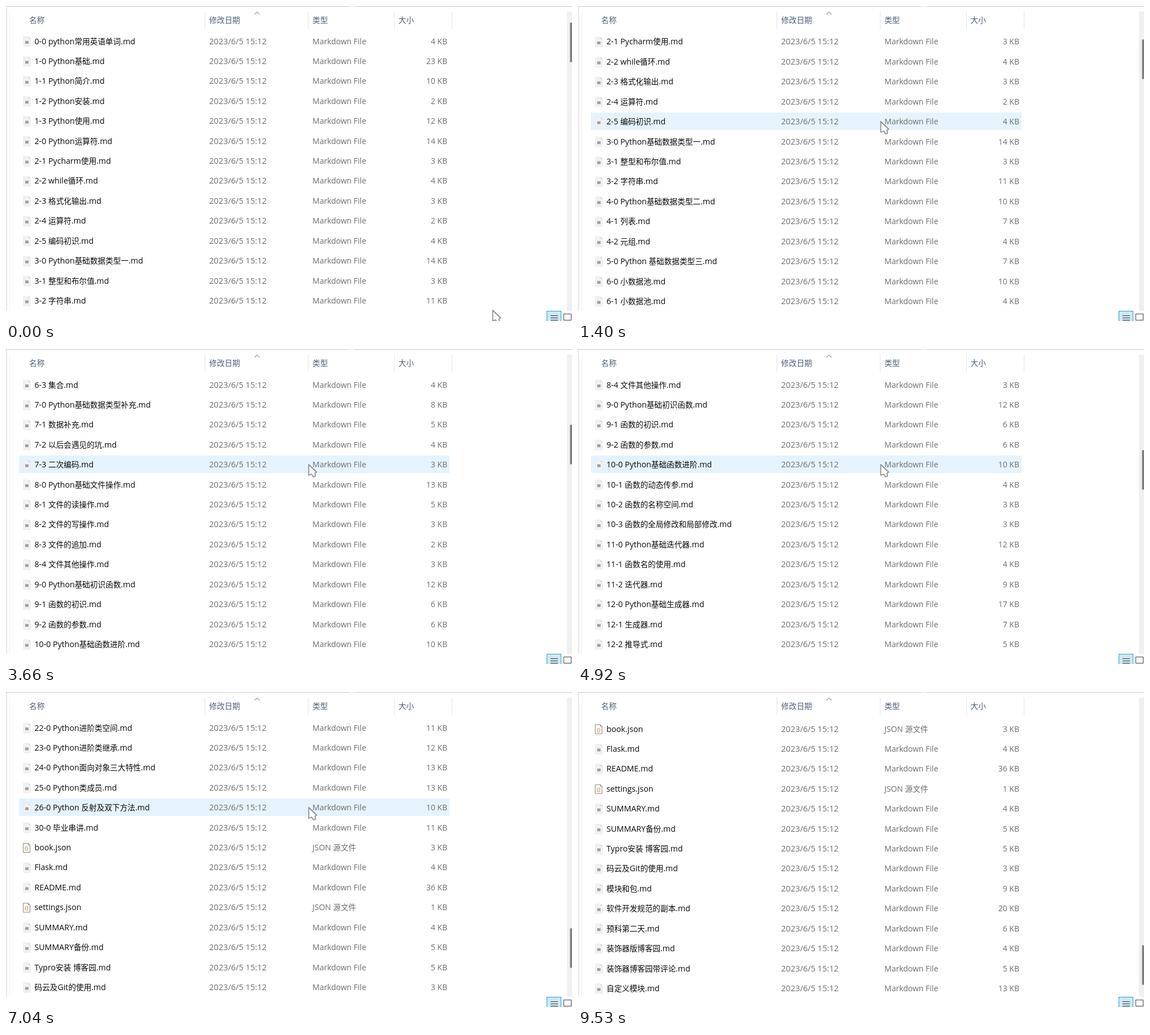
Animation, 1003 px wide and 559 px high, one loop 9.95 s. Source, as an HTML page:

```html
<!DOCTYPE html>
<html lang="zh-CN">
<head>
<meta charset="utf-8">
<title>Python 笔记</title>
<style>
html, body { margin: 0; width: 100%; height: 100%; overflow: hidden; background: #fff; }
svg { display: block; }
text { font: 14.2px 'Open Sans', 'Noto Sans CJK SC', 'Noto Sans CJK', sans-serif; fill: #0a0a0a; }
.cjk { font-size: 13.65px; }
.date { font-size: 14.6px; fill: #6d6d6d; }
.info { font-size: 14px; fill: #6d6d6d; }
.head { font-size: 13.7px; fill: #4c607a; }
.brace { font-size: 9px; font-weight: 600; fill: #d08a2c; text-anchor: middle; }
.size { text-anchor: end; }
</style>
</head>
<body>
<svg width="1003" height="559" viewBox="0 0 1003 559">
  <defs>
    <clipPath id="view"><rect x="0" y="46" width="990" height="495"/></clipPath>
    <g id="md">
      <path d="M31 -8.5H40L43.5 -5V8.5H31Z" fill="#f2f2f2" stroke="#e6e6e6" stroke-width=".8"/>
      <path d="M40 -8.5V-5H43.5Z" fill="#d4d4d4"/>
      <rect x="34" y="-1" width="6" height="5" fill="#a0a0a0"/>
    </g>
    <g id="json">
      <path d="M30.5 -8H39.5L42.5 -5V8H30.5Z" fill="#fff" stroke="#858585"/>
      <path d="M39.5 -8V-5H42.5" fill="none" stroke="#858585"/>
      <text class="brace" x="36.5" y="3.5">{}</text>
    </g>
  </defs>
  <rect width="1003" height="559" fill="#fff"/>
  <path d="M0 .5H1003" stroke="#c6c6c6"/>
  <path d="M608 .5H617" stroke="#eee"/>
  <path d="M1 1V541" stroke="#d2d2d2"/>
  <path d="M6.5 10V541" stroke="#f1f1f1"/>

  <path d="M352.5 10V41M535.5 10V41M688.5 10V41M790.5 10V41" stroke="#e4e4e4"/>
  <path d="M440.5 15L445 10.5L449.5 15" fill="none" stroke="#5c5c5c"/>
  <text class="head" x="41" y="30.3">名称</text>
  <text class="head" x="360" y="30.3">修改日期</text>
  <text class="head" x="543" y="30.3">类型</text>
  <text class="head" x="695.5" y="30.3">大小</text>

  <rect id="hover" x="23" width="763" height="31" fill="#e5f3ff"/>
  <g clip-path="url(#view)"><g id="list"></g></g>

  <rect x="994" y="10" width="9" height="531" fill="#f0f0f0"/>
  <rect id="thumb" x="999.5" width="3.5" height="70" fill="#7f7f7f"/>

  <rect x="958.5" y="541.5" width="25" height="20" fill="#cde8f6" stroke="#26a0da"/>
  <path d="M965 549.5H978M965 553.5H978M965 557.5H978" stroke="#333"/>
  <rect id="tile" x="984" y="541" width="19" height="18" fill="#d8ebfb"/>
  <rect x="988.5" y="546.5" width="13" height="11" fill="#fff" stroke="#444"/>

  <path id="cursor" d="M.5 .5V19.5L5.5 17.5L9 22.5L12.5 21L11.5 16L14.5 14Z" fill="#fff" stroke="#8f8f8f" stroke-width="1.8" stroke-linejoin="round"/>
</svg>
<script>
const LOOP = 9950, PITCH = 35.42, FIRST = 62.5, HOME = [536, 204.5];

// "name|size in KB"; a missing extension means .md
const files = `0-0 python常用英语单词|4
1-0 Python基础|23
1-1 Python简介|10
1-2 Python安装|2
1-3 Python使用|12
2-0 Python运算符|14
2-1 Pycharm使用|3
2-2 while循环|4
2-3 格式化输出|3
2-4 运算符|2
2-5 编码初识|4
3-0 Python基础数据类型一|14
3-1 整型和布尔值|3
3-2 字符串|11
4-0 Python基础数据类型二|10
4-1 列表|7
4-2 元组|4
5-0 Python 基础数据类型三|7
6-0 小数据池|10
6-1 小数据池|4
6-2 深浅拷贝|4
6-3 集合|4
7-0 Python基础数据类型补充|8
7-1 数据补充|5
7-2 以后会遇见的坑|4
7-3 二次编码|3
8-0 Python基础文件操作|13
8-1 文件的读操作|5
8-2 文件的写操作|3
8-3 文件的追加|2
8-4 文件其他操作|3
9-0 Python基础初识函数|12
9-1 函数的初识|6
9-2 函数的参数|6
10-0 Python基础函数进阶|10
10-1 函数的动态传参|4
10-2 函数的名称空间|3
10-3 函数的全局修改和局部修改|3
11-0 Python基础迭代器|12
11-1 函数名的使用|4
11-2 迭代器|9
12-0 Python基础生成器|17
12-1 生成器|7
12-2 推导式|5
12-3 生成器表达式|4
13-0 Python基础内置函数|15
13-1 内置函数一|8
13-2 内置函数二|6
13-3 匿名函数|4
13-4 高阶函数|5
14-0 Python基础闭包|9
14-1 闭包|5
14-2 闭包的应用|3
15-0 Python基础装饰器|14
15-1 开放封闭原则|3
15-2 装饰器|8
15-3 有参装饰器|5
15-4 多个装饰器|4
15-5 递归|5
16-0 Python基础模块|12
16-1 自定义模块|7
16-2 time模块|5
16-3 random模块|3
16-4 os模块|6
16-5 sys模块|3
17-0 Python常用模块|16
17-1 序列化模块|6
17-2 hashlib模块|5
17-3 collections模块|4
18-0 Python正则表达式|13
18-1 re模块|9
18-2 logging模块|6
19-0 Python开发规范|11
19-1 软件开发规范|8
19-2 异常处理|5
19-3 包的使用|6
20-0 Python进阶面向对象|12
21-0 Python进阶初识类|10
22-0 Python进阶类空间|11
23-0 Python进阶类继承|12
24-0 Python面向对象三大特性|13
25-0 Python类成员|13
26-0 Python 反射及双下方法|10
30-0 毕业串讲|11
book.json|3
Flask|4
README|36
settings.json|1
SUMMARY|4
SUMMARY备份|5
Typro安装 博客园|5
码云及Git的使用|3
模块和包|9
软件开发规范的副本|20
预科第二天|6
装饰器版博客园|4
装饰器博客园带评论|5
自定义模块|13`.split('\n');

const $ = id => document.getElementById(id);
const mixed = s => s.replace(/[\u4e00-\u9fff]+/g, '<tspan class="cjk">$&</tspan>');

$('list').innerHTML = files.map((line, i) => {
  const [name, size] = line.split('|');
  const json = name.endsWith('.json');
  return `<g transform="translate(0 ${FIRST + i * PITCH})">
    <use href="#${json ? 'json' : 'md'}" y=".5"/>
    <text x="50.5" y="5">${mixed(json ? name : name + '.md')}</text>
    <text class="date" x="360" y="5">2023/6/5 15:12</text>
    <text class="info" x="543" y="5">${json ? mixed('JSON 源文件') : 'Markdown File'}</text>
    <text class="info size" x="782" y="5">${size} KB</text></g>`;
}).join('');

// Wheel ticks: three rows each for the first dozen, then six
const ticks = [860, 1400, 1850, 2310, 2850, 3200, 3660, 4130, 4520, 4920,
  5310, 5640, 5970, 6320, 6380, 6640, 6700, 6980, 7040, 7380];
const topRow = t => {
  const n = ticks.filter(x => x <= t).length;
  return 3 * n + 3 * Math.max(0, n - 12);
};

const leave = [[556, 216], [612, 255], [690, 315], [766, 374.5], [827, 443], [872, 505],
  [902, 453], [912, 310], [917, 168], [940, 135], [957, 103], [967, 60], [990, 55]];

// Pointer tip at time t, held between steps; null while outside
function pointer(t) {
  if (t < 0) return null;
  if (t >= 8228) return leave[Math.floor((t - 8225) / 69.2)] || null;
  const k = Math.min(8, Math.floor((t + 4) / 66.5));
  const v = (1 - k / 8) ** 2, u = 1 - v;
  const curve = (a, b, c) => v * v * a + 2 * u * v * b + u * u * c;
  return [curve(862, 698, HOME[0]), curve(539.5, 460, HOME[1])];
}

function draw(t) {
  const top = topRow(t);
  const shift = top >= 84 ? 3 : top ? 1 : 0;
  $('list').setAttribute('transform', `translate(0 ${shift - top * PITCH})`);
  $('thumb').setAttribute('y', 29.5 + top * 5);

  const tip = pointer(t);
  $('cursor').style.display = tip ? '' : 'none';
  if (tip) $('cursor').setAttribute('transform', `translate(${tip})`);

  // Row highlight trails the pointer by one step
  const past = pointer(t - 62);
  const over = past && past[0] < 786 && past[1] < 541;
  $('hover').style.display = over ? '' : 'none';
  if (over) {
    const row = Math.round((past[1] - FIRST - shift) / PITCH);
    $('hover').setAttribute('y', Math.round(FIRST + shift + row * PITCH - 16));
  }

  $('tile').style.opacity = t < 9400 || t >= 9530 ? 0 : t < 9470 ? 1 : 0.5;
}

const start = performance.now();
function tick() {
  draw((performance.now() - start) % LOOP);
  requestAnimationFrame(tick);
}
tick();
</script>
</body>
</html>
```
